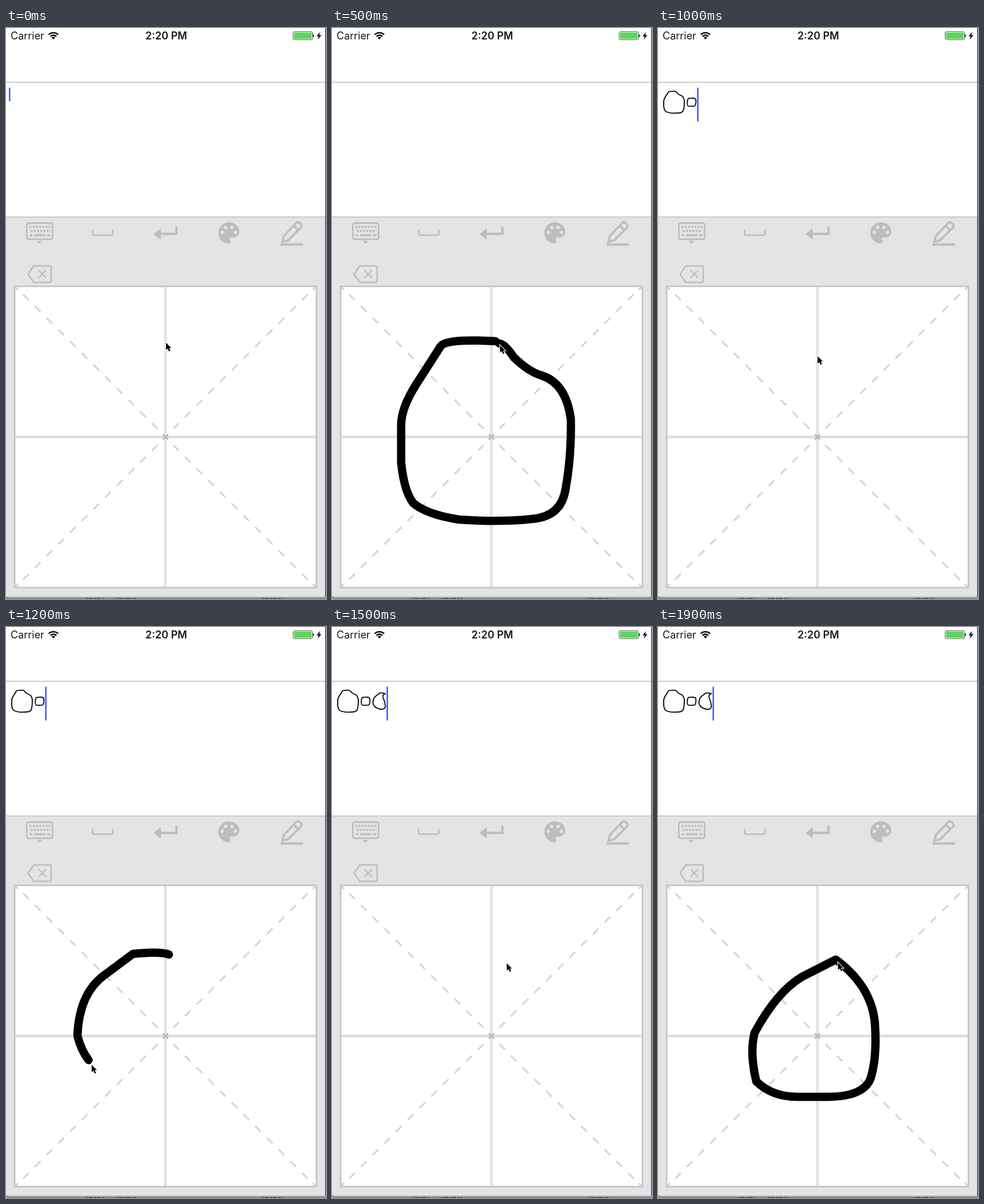
Animation, 560 px wide and 999 px high, one loop 2 s. Source, as an HTML page:

```html
<!DOCTYPE html>
<html lang="en">
<head>
<meta charset="utf-8">
<title>Handwriting keyboard</title>
<style>
  html, body { margin: 0; width: 100%; height: 100%; overflow: hidden; background: #fff; }
  svg { display: block; width: 560px; height: 999px; }
  text { font-family: Inter, Roboto, sans-serif; font-size: 18px; fill: #161616; }
  .icons { fill: none; stroke: #bdbdbd; stroke-width: 2.6; }
  .icons .solid { fill: #bdbdbd; stroke: none; }
  .ink { fill: none; stroke: #000; stroke-linecap: round; stroke-linejoin: round; }
</style>
</head>
<body>
<svg viewBox="0 0 560 999">
  <rect width="560" height="999" fill="#fff"/>

  <!-- status bar -->
  <text x="8" y="20">Carrier</text>
  <text x="280.5" y="20" text-anchor="middle" font-weight="600">2:20 PM</text>
  <g fill="none" stroke="#111" stroke-width="2.6">
    <path d="M74.7 11.7A11.8 11.8 0 0 1 91.3 11.7M77.8 14.8A7.4 7.4 0 0 1 88.2 14.8"/>
    <path d="M83 20L79.8 16.8A4.5 4.5 0 0 1 86.2 16.8Z" fill="#111" stroke="none"/>
  </g>
  <rect x="502.5" y="6.5" width="34" height="14" rx="2.5" fill="#fff" stroke="#555"/>
  <rect x="504" y="8" width="31" height="11" rx="1" fill="#5bd75b"/>
  <path d="M537.5 11Q540 13.5 537.5 16Z" fill="#444" stroke="#444"/>
  <path d="M549.5 7L543.5 14.5H547L545.5 20.5L552 12.5H548.3Z" fill="#111"/>
  <path d="M0 95H559" stroke="#bbb" stroke-width="1.6"/>

  <!-- keyboard panel -->
  <rect y="994" width="560" height="5" fill="#aaa"/>
  <path d="M0 995Q1 998 6 998H560" fill="none" stroke="#858585" stroke-width="2"/>
  <path d="M140 998H170M192 998H228M448 998H484" stroke="#555" stroke-width="2" stroke-dasharray="3 2 6 3"/>
  <path d="M0 330H559V990Q559 995 554 995H5Q0 995 0 990Z" fill="#e4e4e4"/>
  <path d="M0 330.5H559" stroke="#aaa"/>
  <path d="M559.3 0V995" stroke="#444" stroke-width="1.4"/>

  <g class="icons">
    <rect x="36.4" y="341.4" width="45.2" height="28.2" rx="3"/>
    <path d="M41 348H78M43 355H78" stroke-width="3.4" stroke-dasharray="3.6 2"/>
    <path d="M41 362.5H46M49 362.5H69M72 362.5H78" stroke-width="3.4"/>
    <path class="solid" d="M53.5 372.5H63.5L58.5 377.5Z"/>
    <path d="M151.5 353V359.5Q151.5 362.5 154.5 362.5H184Q187 362.5 187 359.5V353"/>
    <path d="M268 360.3H298.3V347.5" stroke-width="4"/>
    <path class="solid" d="M258 360.3L271 350.5V370.5Z"/>
    <path class="solid" transform="translate(365.3 333.8) scale(2.05)"
      d="M12 3a9 9 0 0 0 0 18c.8 0 1.5-.7 1.5-1.5 0-.4-.2-.7-.4-1-.2-.3-.4-.6-.4-1 0-.8.7-1.5 1.5-1.5H16a5 5 0 0 0 5-5c0-4.4-4-8-9-8Z"/>
    <path d="M378.5 357.5h0M384.5 349h0M395.5 349h0M401.5 357.5h0" stroke="#e4e4e4" stroke-width="6" stroke-linecap="round"/>
    <path d="M483.5 374L486.5 363.5L508.5 340.5Q511 338.5 513.5 341L516.5 344Q518.5 346.5 516.5 348.8L493.5 371.5ZM503.5 346L511.5 354" stroke-width="3.6"/>
    <path d="M480.5 378.7H519.5" stroke-width="4"/>
    <path d="M38.7 430.5L48.5 416.3H76Q79 416.3 79 419.3V442Q79 445 76 445H48.5Z"/>
    <path d="M57 424L70 437M70 424L57 437" stroke-width="2.2"/>
  </g>

  <!-- writing grid -->
  <rect x="15.2" y="452" width="528" height="527" fill="#fff" stroke="#c4c4c4" stroke-width="2.6"/>
  <path d="M279 453V978" stroke="#e4e4e4" stroke-width="5"/>
  <path d="M16 715.5H542" stroke="#dcdcdc" stroke-width="4.5"/>
  <path d="M30 466L265 701M528 466L293 701M30 965L265 730M528 965L293 730"
    stroke="#d3d3d3" stroke-width="3" stroke-dasharray="14 15"/>
  <path d="M274.5 711L283.5 720M283.5 711L274.5 720" stroke="#b8b8b8" stroke-width="3"/>
  <path d="M16 453l5 5M542 453l-5 5M16 978l5-5M542 978l-5-5" stroke="#d0d0d0" stroke-width="3"/>

  <!-- moving parts -->
  <g id="glyphs" class="ink" stroke-width="15"></g>
  <rect id="caret" y="104.5" width="2.6" fill="#4a5bdc"/>
  <g id="strokes" class="ink" stroke-width="14.5"></g>
  <path id="cursor" d="M0 0V13L3 10.3L5.3 15.2L7.6 14.2L5.4 9.4H9.3Z" stroke="#fff" stroke-width="2" paint-order="stroke"/>
</svg>
<script>
const $ = id => document.getElementById(id);
const FRAME_MS = 100, FRAMES = 20;
const GLYPH_SCALE = 0.1215, LINE_MIDDLE = 129.7, GLYPH_GAP = 5.2;
const CARET_ON_FRAMES = 4, CURSOR_LEAD = 7;

// Each character is one pen stroke, begun at frame `start`.
const characters = [
  { start: 0, d: `M286 548Q200 543 190 557L147 624Q121 665 121 695V760Q126 810 142 831Q165 851 222 860
      Q295 865 350 859Q402 855 409 805Q419 750 418 685Q410 622 367 608Q345 602 318 576Q303 553 293 552` },
  { start: 6, d: `M284 611L238 615Q220 627 219 661Q214 722 232 726Q270 729 322 727Q342 715 342 650Q344 610 292 612` },
  { start: 10, d: `M285 573Q270 567 222 572L175 607Q128 639 125 715Q140 777 200 793
      Q295 828 305 760Q298 690 272 640Q258 597 305 577` },
  { start: 15, d: `M311 582L252 612Q208 638 169 710Q160 745 172 795Q200 822 243 822H300
      Q360 821 372 790Q383 755 380 700Q377 632 314 584` }
];

function addPath(parent, d) {
  const path = document.createElementNS("http://www.w3.org/2000/svg", "path");
  path.setAttribute("d", d);
  return parent.appendChild(path);
}

// Glyphs are shrunken strokes set side by side, centred on the text line.
let penX = 10;
characters.forEach((character, i) => {
  const { start, d } = character;
  const end = characters[i + 1]?.start ?? FRAMES;
  const stroke = addPath($("strokes"), d), glyph = addPath($("glyphs"), d);
  const box = stroke.getBBox();
  glyph.setAttribute("transform", `translate(${penX} ${LINE_MIDDLE}) scale(${GLYPH_SCALE})
    translate(${-box.x} ${-box.y - box.height / 2})`);
  Object.assign(character, {
    stroke, glyph, length: stroke.getTotalLength(), frames: end - start - 1,
    caretX: i ? penX - 3.2 : 5
  });
  penX += box.width * GLYPH_SCALE + GLYPH_GAP;
});

function draw(frame) {
  const current = characters.findLastIndex(c => c.start <= frame);
  const { start, frames, stroke, length, caretX } = characters[current];
  const elapsed = frame - start;
  const drawn = length * (elapsed / frames) ** 1.25;

  characters.forEach((c, i) => {
    c.glyph.style.display = i < current ? "" : "none";
    c.stroke.style.display = i === current && elapsed > 0 ? "" : "none";
  });
  stroke.style.strokeDasharray = `${drawn} ${length + 50}`;

  const caret = $("caret");
  caret.setAttribute("x", caretX);
  caret.setAttribute("height", current ? 59 : 23.5);
  caret.setAttribute("opacity", elapsed <= CARET_ON_FRAMES ? 1 : 0);

  // The pointer runs slightly ahead of the ink.
  const tip = stroke.getPointAtLength(drawn + CURSOR_LEAD);
  $("cursor").setAttribute("transform", `translate(${tip.x + 1} ${tip.y + 3})`);
}

function tick() {
  draw(Math.floor(performance.now() / FRAME_MS) % FRAMES);
  requestAnimationFrame(tick);
}
tick();
</script>
</body>
</html>
```
